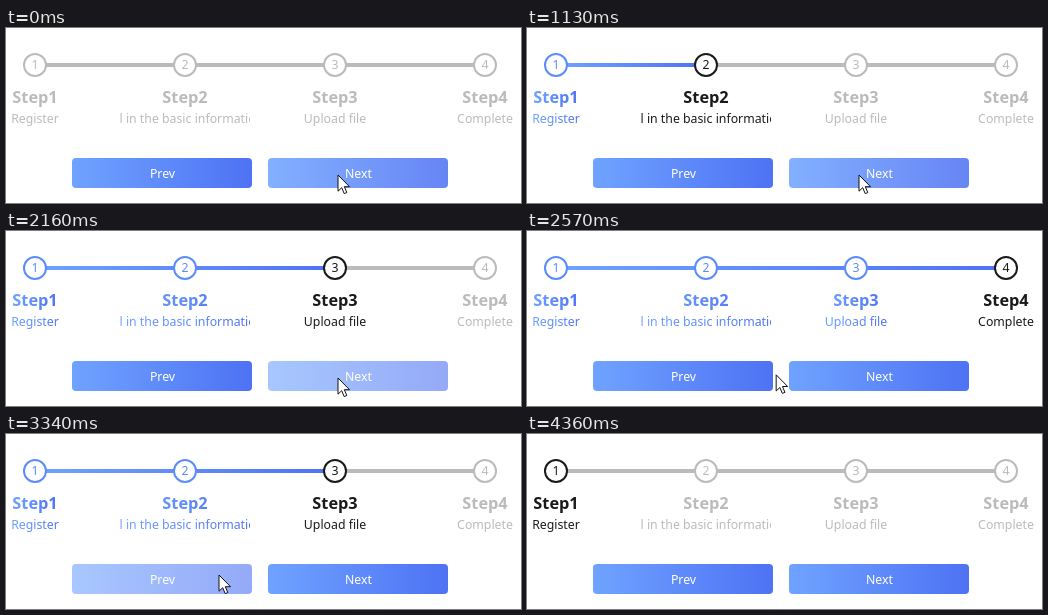
Animation, 515 px wide and 175 px high, one loop 4.79 s. Source, as an HTML page:

```html
<!DOCTYPE html>
<html lang="en">
<head>
<meta charset="utf-8">
<title>Step progress</title>
<style>
  html, body { margin: 0; width: 100%; height: 100%; overflow: hidden; background: #fff; }
  svg { display: block; width: 515px; height: 175px; font-family: "Noto Sans", "Open Sans", sans-serif; }
  text { text-anchor: middle; }
  .title { font-size: 16.3px; font-weight: 700; }
  .note, .num, .label { font-size: 12.3px; }
  .label { fill: #fff; font-weight: 500; }
</style>
</head>
<body>
<svg id="stage" viewBox="0 0 515 175" xmlns="http://www.w3.org/2000/svg"></svg>
<script>
const LOOP = 4790, LEFT = 29, GAP = 150, LINE_Y = 37;
const GRAY = '#bbb', DARK = '#1a1a1a', BLUE = '#5c8cfc';
const STEPS = [
  ['Register', 47], ['Fill in the basic information', 130],
  ['Upload file', 62], ['Complete', 56]
];
// [press time, release time, step after release], button 0 = Prev, 1 = Next
const CLICKS = [
  [770, 950, 1, 1], [1550, 1610, 2, 1], [2160, 2220, 3, 1],
  [2870, 2980, 2, 0], [3340, 3520, 1, 0], [3940, 4000, 0, 0]
];
// [time, x, y] of the pointer tip
const PATH = [
  [0, 332, 147], [2340, 332, 147], [2630, 228, 143], [2690, 213, 141],
  [4030, 213, 141], [4330, 450, 172]
];

const stage = document.getElementById('stage');

function add(tag, attrs, parent = stage, content = '') {
  const el = document.createElementNS('http://www.w3.org/2000/svg', tag);
  for (const key in attrs) el.setAttribute(key, attrs[key]);
  el.textContent = content;
  parent.appendChild(el);
  return el;
}

const defs = add('defs', {});

function gradient(id, x1, x2) {
  const g = add('linearGradient', { id, x1, x2, y1: 0, y2: 0, gradientUnits: 'userSpaceOnUse' }, defs);
  add('stop', { offset: 0, 'stop-color': '#6fa3ff' }, g);
  add('stop', { offset: 1, 'stop-color': '#4e72f4' }, g);
  return g;
}

const clip = add('clipPath', { id: 'noteClip' }, defs);
add('rect', { x: 114, y: 80, width: 130, height: 22 }, clip);

add('rect', { x: LEFT, y: LINE_Y - 2, width: GAP * 3, height: 4, fill: GRAY });
const barFill = gradient('barFill', LEFT, LEFT + GAP);
const bar = add('rect', { x: LEFT, y: LINE_Y - 2, width: 0, height: 4, fill: 'url(#barFill)' });

const steps = STEPS.map(([note, width], i) => {
  const x = LEFT + GAP * i;
  gradient('text' + i, x - width / 2, x + width / 2);
  return {
    ring: add('circle', { cx: x, cy: LINE_Y, r: 11, fill: '#fff', 'stroke-width': 2 }),
    num: add('text', { class: 'num', x, y: 41.4 }, stage, i + 1),
    title: add('text', { class: 'title', x, y: 75 }, stage, 'Step' + (i + 1)),
    note: add('text', { class: 'note', x, y: 95, ...(i === 1 && { 'clip-path': 'url(#noteClip)' }) }, stage, note)
  };
});

const buttons = ['Prev', 'Next'].map((label, i) => {
  const x = 66 + 196 * i;
  gradient('button' + i, x, x + 180);
  const g = add('g', {});
  add('rect', { x, y: 130, width: 180, height: 30, rx: 4, fill: `url(#button${i})` }, g);
  add('text', { class: 'label', x: x + 90.5, y: 149.6 }, g, label);
  return g;
});

const pointer = add('path', {
  d: 'M0 0V16.2L3.7 12.7L6.2 18.6L8.8 17.5L6.3 11.7H11.5Z',
  fill: '#fff', stroke: '#111', 'stroke-width': 1, 'stroke-linejoin': 'round'
});

const mix = (a, b, p) => a + (b - a) * p;
const easeOut = p => 1 - (1 - p) ** 3;

function pointerAt(t) {
  const i = PATH.findIndex(p => p[0] > t);
  if (i < 0) return null;
  const [t0, x0, y0] = PATH[i - 1], [t1, x1, y1] = PATH[i];
  const p = (t - t0) / (t1 - t0);
  return [mix(x0, x1, p), mix(y0, y1, p)];
}

function hovered(t, pos) {
  if (!pos || pos[1] > 160) return -1;
  if (pos[0] >= 262) return 1;
  return pos[0] <= 246 && t >= 2690 ? 0 : -1;
}

function render(t) {
  let current = -1, previous = -1, since = 0, pressed = -1;
  for (const [down, up, step, button] of CLICKS) {
    if (t >= down && t < up) pressed = button;
    if (t >= up) [previous, current, since] = [current, step, up];
  }

  const p = easeOut(Math.min(1, (t - since + 20) / 190));
  const length = GAP * mix(Math.max(0, previous), Math.max(0, current), p);
  bar.setAttribute('width', length);
  barFill.setAttribute('x2', LEFT + Math.max(1, length));

  steps.forEach(({ ring, num, title, note }, i) => {
    const done = i < current;
    const color = done ? BLUE : i === current ? DARK : GRAY;
    const textFill = done ? `url(#text${i})` : color;
    ring.setAttribute('stroke', color);
    num.setAttribute('fill', color);
    title.setAttribute('fill', textFill);
    note.setAttribute('fill', textFill);
  });

  const pos = pointerAt(t);
  const over = hovered(t, pos);
  buttons.forEach((b, i) => b.setAttribute('opacity', i === pressed ? 0.6 : i === over ? 0.86 : 1));
  pointer.setAttribute('visibility', pos ? 'visible' : 'hidden');
  if (pos) pointer.setAttribute('transform', `translate(${pos[0]} ${pos[1]})`);
}

const start = performance.now();
function tick() {
  render((performance.now() - start) % LOOP);
  requestAnimationFrame(tick);
}
tick();
</script>
</body>
</html>
```
